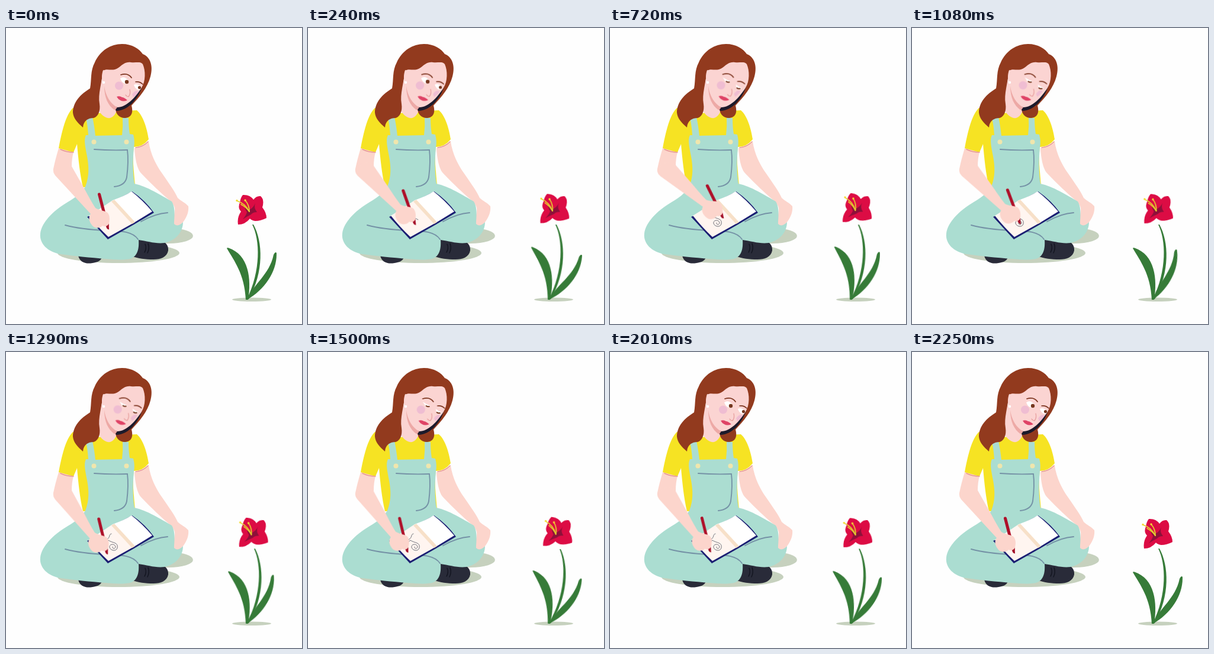
An HTML page that plays this animation: 500x500 px, repeating every 2.28 s.

```html
<!DOCTYPE html>
<html lang="en">
<head>
<meta charset="utf-8">
<title>Sketching a flower</title>
<style>
  html, body { margin: 0; width: 100%; height: 100%; overflow: hidden; background: #fefefe; }
  svg { display: block; width: 100vw; height: 100vh; }

  .stem, .leaf-l, .leaf-r, .head, .stamens, .arm, .sketch, .features, .eyes-up, .eyes-down {
    animation: 2280ms infinite cubic-bezier(.37, 0, .63, 1);
  }
  .stem, .leaf-l, .leaf-r { transform-origin: 408px 459px; }
  .stem { animation-name: stem; }
  .leaf-l { animation-name: leaf-l; }
  .leaf-r { animation-name: leaf-r; }
  .head { transform-origin: 415px 307px; animation-name: head; }
  .stamens { transform-origin: 412px 311px; animation-name: stamens; }
  .arm { transform-origin: 90px 240px; animation-name: arm; animation-timing-function: linear; }
  .sketch { stroke-dasharray: 100; animation-name: sketch; animation-timing-function: linear; }
  .features { animation-name: features; }
  .eyes-up { animation-name: look-up; animation-timing-function: step-end; }
  .eyes-down { animation-name: look-down; animation-timing-function: step-end; }

  @keyframes stem {
    0%, 48%, 99%, 100% { transform: rotate(0deg); }
    22% { transform: rotate(1.8deg); }
    73% { transform: rotate(5deg); }
  }
  @keyframes leaf-l {
    0%, 48%, 99%, 100% { transform: rotate(0deg); }
    22%, 74% { transform: rotate(5.3deg); }
  }
  @keyframes leaf-r {
    0%, 99%, 100% { transform: rotate(0deg); }
    14% { transform: rotate(5.2deg); }
    49% { transform: rotate(-6.7deg); }
    70% { transform: rotate(5.2deg); }
  }
  @keyframes head {
    0%, 99%, 100% { transform: none; }
    22% { transform: translate(4.5px, -1.8px) rotate(8deg); }
    48% { transform: translate(1.7px, -.8px) rotate(3deg); }
    74% { transform: translate(9.7px, -2px) rotate(8deg); }
  }
  @keyframes stamens {
    0%, 99%, 100% { transform: rotate(0deg); }
    22%, 74% { transform: rotate(5deg); }
    48% { transform: rotate(1deg); }
  }
  @keyframes arm {
    0%, 98.6%, 100% { transform: rotate(0deg) scale(1); }
    21% { transform: rotate(-10deg) scale(1); }
    31.6% { transform: rotate(-11.6deg) scale(1); }
    47.4% { transform: rotate(-6deg) scale(1); }
    56.6% { transform: rotate(1deg) scale(1); }
    75% { transform: rotate(1.3deg) scale(.94); }
  }
  @keyframes sketch {
    0%, 3% { stroke-dashoffset: 100; opacity: 0; }
    4% { opacity: 1; }
    20% { stroke-dashoffset: 0; }
    88% { opacity: 1; }
    95%, 100% { stroke-dashoffset: 0; opacity: 0; }
  }
  @keyframes features {
    0%, 70%, 100% { transform: none; }
    20%, 48% { transform: translate(-3.5px, -.7px); }
  }
  @keyframes look-up {
    0%, 70%, 100% { opacity: 1; }
    12% { opacity: 0; }
  }
  @keyframes look-down {
    0%, 70%, 100% { opacity: 0; }
    12% { opacity: 1; }
  }

  .skin { fill: #fcd5cc; }
  .face { fill: #fbd4d2; }
  .hair { fill: #923a1e; }
  .shirt { fill: #f6e323; }
  .denim { fill: #abddd1; }
  .seam { fill: none; stroke: #7592a6; stroke-width: 1.9; stroke-linecap: round; }
  .shade { fill: #c6d1be; }
  .shoe { fill: #292b39; }
  .navy { fill: #1b1e73; }
  .green { fill: #367b38; }
  .blush { fill: #efbdd2; }
  .line { fill: none; stroke-linecap: round; stroke-linejoin: round; }
</style>
</head>
<body>
<svg viewBox="0 0 500 500">
  <ellipse class="shade" cx="190" cy="380" rx="103" ry="17"/>
  <ellipse class="shade" cx="275" cy="351" rx="41" ry="13"/>

  <!-- shoes -->
  <path class="shoe" d="M122 384C124 396 135 399 146 397C154 396 161 393 162 387Z"/>
  <path class="shoe" d="M217 358C232 356 246 361 259 359C269 360 275 367 274 376C272 387 261 391 249 391C236 391 222 389 214 386Z"/>
  <path class="line" stroke="#11131e" stroke-width="1.3" d="M235 365Q238 372 234 379M240 364Q243 372 239 380"/>

  <!-- torso and sleeves -->
  <path class="shirt" d="M113 135C103 145 96 165 89 203Q101 210 114 210L120 196C122 220 125 248 130 269L218 266C216 240 213 220 216 201Q231 201 241 188C238 168 231 147 221 139L200 140L140 145Z"/>

  <!-- right arm -->
  <path class="skin" d="M217 203C218 220 221 236 227 244C240 258 257 274 268 284C276 291 284 297 285 304C286 312 281 324 284 332C288 337 294 334 299 328C306 319 309 309 308 301C303 295 295 292 290 287C285 275 274 261 264 246C253 231 244 212 241 192Q230 202 217 203Z"/>
  <path class="line" stroke="#e79a93" stroke-width="1.6" d="M219 202Q231 201 240 192"/>

  <!-- overalls -->
  <path class="denim" d="M135 152L146 150Q149 164 151 182L196 181Q198 166 197 152L207 152Q207 167 209 179L215 180Q218 191 216 202C214 225 214 242 217 263C237 267 263 283 280 293C287 304 284 322 284 331Q290 337 299 328C299 343 289 358 268 363C253 365 239 360 224 358C225 371 223 384 212 389C201 393 185 391 168 390C144 388 113 385 92 382C70 378 56 364 58 347C60 331 74 315 92 302C108 291 124 284 134 268C141 250 140 234 137 217C134 201 131 189 135 181L139 181Q138 165 135 152Z"/>
  <path class="seam" d="M149 205Q176 207 205 206"/>
  <path class="seam" stroke-width="2.2" d="M205 206C207 222 206 236 204 252C202 262 194 267 183 268"/>
  <path class="seam" d="M100 333C122 339 145 341 168 342C189 343 213 342 223 357M228 327C242 319 257 313 273 312"/>
  <g fill="#f0e6ad"><circle cx="148.5" cy="192.5" r="4"/><circle cx="203.5" cy="192.5" r="4"/></g>

  <!-- neck, hair, face -->
  <path class="face" d="M158 85L156 138C161 148 169 153 176 152C182 150 185 145 187 139L190 125Z"/>
  <path class="hair" d="M130 168C121 160 114 153 113 143C113 125 126 112 142 102C145 86 142 73 150 58C159 38 177 27 196 27C213 27 225 35 231 44C244 49 249 64 244 82C239 101 226 116 212 131C215 142 213 151 201 152C191 152 185 145 185 135L205 95L164 71C162 92 155 112 158 128C160 141 155 150 148 152C139 152 131 156 130 168Z"/>
  <path fill="#1c1a2b" d="M184 134C201 132 215 120 231 95C225 118 207 140 186 140Z"/>
  <path class="face" d="M164 72C170 68 176 72 184 70C194 67 198 56 211 58C220 59 227 56 231 61C236 72 236 90 229 101C218 118 203 134 188 134C178 130 171 116 166 97C161 92 161 78 164 72Z"/>
  <path fill="#eda9a6" d="M166 98C168 114 176 128 188 134L184 139C172 131 166 117 166 98Z"/>
  <circle cx="165" cy="92" r="2.2" fill="#fff"/>
  <g class="features">
    <circle class="blush" cx="191" cy="97.5" r="7"/>
    <path class="blush" d="M213 112Q218 104 224 107Q222 112 215 117Z"/>
    <g class="line" stroke="#7c341f" stroke-width="1.7">
      <path d="M194 79Q206 75 212 84"/>
      <path d="M219 91Q226 90 231 95"/>
    </g>
    <g class="eyes-up">
      <path fill="#fff" d="M193 85Q200 80 207 89Q206 95 201 94Q195 92 193 85ZM216 96Q222 93 229 100Q226 105 222 104Q218 102 216 96Z"/>
      <g fill="#76371f"><circle cx="204" cy="91" r="3.2"/><circle cx="225.5" cy="100.500" r="2.6"/></g>
    </g>
    <g class="eyes-down">
      <path fill="#fff" d="M194 84Q200 88 207 91Q203 95 199 92ZM216 96Q221 100 226 102Q221 106 217 101Z"/>
      <path class="line" stroke="#76371f" stroke-width="2" d="M200 91Q202 93 205 92M218 102Q220 104 223 103"/>
    </g>
    <path class="line" stroke="#e79f9e" stroke-width="1.3" d="M209 104Q211 111 207 116Q204 116 202 113"/>
    <path fill="#df4366" d="M187 116Q192 114 196 117Q199 117 205 122Q198 125 193 122Q189 120 187 116Z"/>
  </g>

  <!-- notebook -->
  <path class="navy" d="M137 319L142 317L181 293L213 276Q235 291 250 312L216 332L172 357Z"/>
  <path fill="#fff5f0" d="M140 317Q158 306 180 291L216 329L173 353Q155 336 140 317Z"/>
  <path fill="#fff" d="M180 291Q200 284 212 276Q231 291 247 310L216 329Z"/>
  <path fill="#f7e0c8" d="M178 293L183 290L218 328L213 331Z"/>
  <path class="sketch line" pathLength="100" stroke="#4a505c" stroke-width=".8" d="M178 307C173 308 177 313 170 317C164 321 168 323 173 318C180 323 190 321 188 331C186 338 176 335 175 330C174 324 184 323 185 329C185 333 179 333 180 329"/>

  <!-- drawing arm -->
  <path class="skin" d="M89 203Q83 223 80 238Q79 245 86 250L102 255L111 234Q111 220 114 210Z"/>
  <path class="line" stroke="#e79a93" stroke-width="1.6" d="M92 205Q102 210 114 210"/>
  <g class="arm">
    <path class="line" stroke="#ae1029" stroke-width="5" d="M157.500 281L171 333"/>
    <path fill="#a30f28" d="M167.500 331L173.500 330L174 340.500Q171 340 170 338Z"/>
    <path class="skin" d="M80 238Q79 244 83 249L143 314C138 321 141 329 147 335C152 339 160 338 163 334C167 336 172 335 174 330C176 322 175 314 170 311C164 308 157 308 151 304C145 295 137 280 131 269L110 232Q94 222 80 238Z"/>
  </g>

  <!-- flower -->
  <ellipse class="shade" cx="415" cy="458.700" rx="33" ry="3.200"/>
  <path class="stem green" d="M416 332C429 358 431 409 407 458L410 458C436 412 434 361 418 332Z"/>
  <path class="leaf-l green" d="M373 372C385 393 403 415 405 459L409 459C415 424 410 383 376 371.500Q373 371 373 372Z"/>
  <path class="leaf-r green" d="M407 459C418 432 445 417 452 383Q455 377 457 380C458 411 437 442 407 459Z"/>
  <g class="head">
    <path fill="#dc0c44" d="M400 282Q412 281 418 290Q423 283 430 284Q437 290 433 303Q440 312 440 321Q430 326 421 326Q415 325 412 322Q404 332 392 332Q390 320 397 310Q391 304 395 295Q396 287 400 282Z"/>
    <path fill="#8d1039" d="M421 296Q418 304 424 311Q417 311 414 315Q408 318 400 323Q406 316 407 311Q402 304 404 299Q410 307 413 306Q418 303 421 296Z"/>
    <g class="stamens">
      <g class="line" stroke="#e6d02f" stroke-width="1.8">
        <path d="M411 310Q404 296 390 292"/>
        <path d="M411 310Q411 299 404 291"/>
        <path d="M411 310Q405 302 397 298"/>
      </g>
      <g fill="#f2dd35"><circle cx="390" cy="291.500" r="1.7"/><circle cx="404" cy="291" r="1.7"/></g>
    </g>
  </g>
</svg>
</body>
</html>
```
